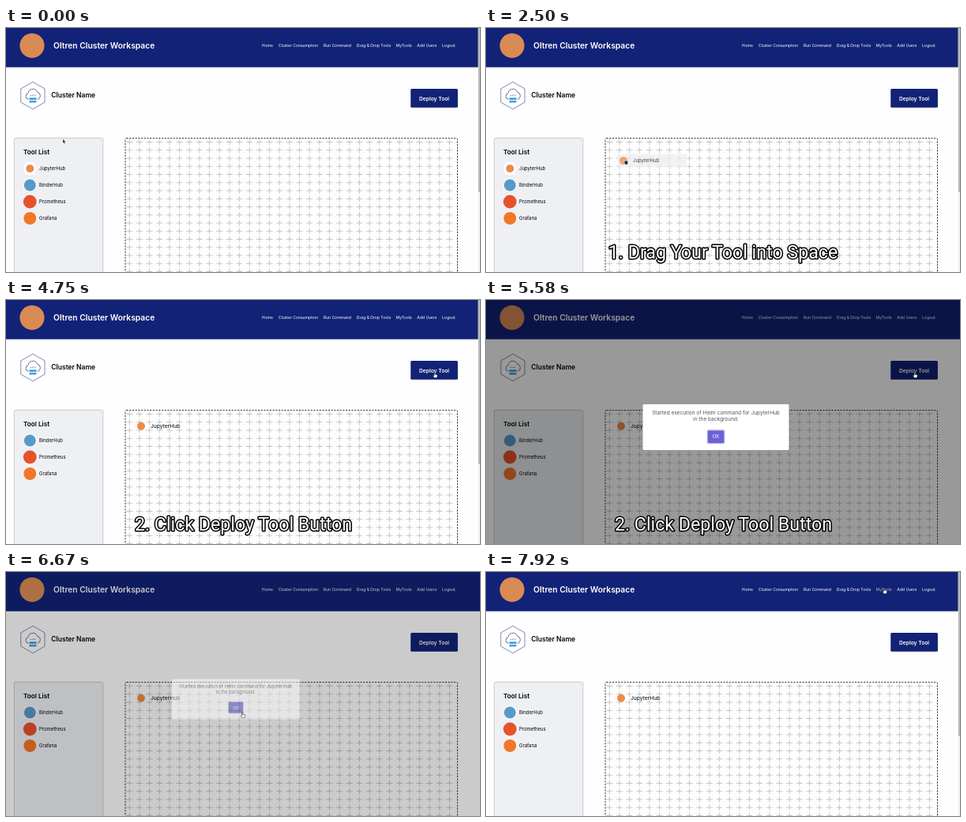
These frames come from a looping animation (600 px wide and 309 px high, 8 s). An HTML page:

```html
<!DOCTYPE html>
<html lang="en">
<head>
<meta charset="utf-8">
<title>Drag and drop tools</title>
<style>
html, body { margin: 0; width: 100%; height: 100%; overflow: hidden; background: #fefefe; }
svg { display: block; width: 100vw; height: 100vh; font-family: Inter, sans-serif; }
.nav { font-size: 5.05px; fill: #fff; }
.mid { text-anchor: middle; }
.cap { font: 400 23.2px Roboto, sans-serif; fill: #fff; stroke: #000; stroke-width: 3px;
  stroke-linejoin: round; paint-order: stroke; text-anchor: middle; }
</style>
</head>
<body>
<svg viewBox="0 0 600 309" preserveAspectRatio="none">
  <defs>
    <pattern id="plus" x="150" y="139.4" width="12.66" height="10.25" patternUnits="userSpaceOnUse">
      <path d="M2.2 5.1h8M6.2 1.3v7.6" stroke="#b4b4b8" stroke-width=".75"/>
    </pattern>
  </defs>
  <rect width="600" height="309" fill="#fefefe"/>
  <rect width="600" height="49.7" fill="#122276"/>
  <circle cx="33" cy="22.3" r="15.6" fill="#d98a55"/>
  <text x="60" y="26" font-size="10.3" font-weight="600" fill="#fff">Oltren Cluster Workspace</text>
  <g id="nav"></g>

  <g fill="none" stroke="#5a6078" stroke-width=".9" stroke-linejoin="round">
    <path d="M34 68.3 49 76.9v17.2L34 102.7 18.8 94.1V76.9Z" fill="#fff" stroke="#7480a6"/>
    <path d="M28.6 90.3a3.9 3.9 0 0 1-.5-7.7 6 6 0 0 1 11.6-1.3 4.6 4.6 0 0 1 .2 9"/>
    <path d="M30.7 85.3h7" stroke-dasharray="1.4 1.2"/>
    <path d="M29.5 89.6h9M29.5 93.2h9" stroke="#45a0e0" stroke-width="2.6"/>
  </g>
  <text x="57.3" y="88.4" font-size="8.5" font-weight="600">Cluster Name</text>
  <rect x="512.2" y="77" width="59.7" height="23.8" rx="1.5" fill="#122276"/>
  <text class="mid" x="542" y="91.6" font-size="6.7" font-weight="600" fill="#fff">Deploy Tool</text>

  <rect x="10.4" y="139.4" width="112.4" height="190" rx="1.5" fill="#eef0f3" stroke="#b3b6bb" stroke-width=".7"/>
  <text x="22" y="159.6" font-size="8.2" font-weight="600">Tool List</text>
  <g id="tools"></g>

  <rect x="151" y="139.6" width="420.5" height="200" fill="url(#plus)"/>
  <rect x="151" y="139.6" width="420.5" height="200" rx="1.5" fill="none" stroke="#1c1c1c" stroke-width=".9" stroke-dasharray="2.2 1.5"/>
  <g id="dropped">
    <circle cx="171" cy="159.7" r="5" fill="#f0894a"/>
    <text x="183" y="162.2" font-size="6.7">JupyterHub</text>
  </g>
  <g id="ghost" opacity=".75">
    <rect x="22" y="169.5" width="88" height="17" fill="#eceef1"/>
    <circle cx="30" cy="178" r="5" fill="#f0894a"/>
    <text x="42" y="180.4" font-size="5.95">JupyterHub</text>
  </g>
  <g id="scroll">
    <rect x="597.6" width="2.4" height="309" fill="#f1f1f1"/>
    <rect x="597.9" width="2.1" height="208" fill="#b9b9bd"/>
  </g>

  <rect id="dim" width="600" height="309"/>
  <g id="modal">
    <rect x="-108" y="-34" width="216" height="68" rx="2" fill="#fff"/>
    <g class="mid" font-size="7.65" fill="#545454">
      <text y="-19.2">Started execution of Helm command for JupyterHub</text>
      <text y="-9.8">in the background.</text>
    </g>
    <rect x="-13.2" y="3.8" width="26.4" height="21" rx="2.4" fill="#b7b2ef"/>
    <rect id="ok" x="-11.8" y="5.2" width="23.6" height="18.2" rx="1.5"/>
    <text class="mid" y="16.8" font-size="7" fill="#fff">OK</text>
  </g>
  <text id="cap1" class="cap" x="300" y="292">1. Drag Your Tool into Space</text>
  <text id="cap2" class="cap" x="300.5" y="292">2. Click Deploy Tool Button</text>
  <path id="cursor" stroke-linejoin="round"/>
</svg>
<script>
const $ = id => document.getElementById(id);
const LOOP = 8000, STEP = 1000 / 12;

$('nav').innerHTML = [[323.7, 'Home'], [344.8, 'Cluster Consumption'], [401.8, 'Run Command'],
  [443.8, 'Drag &amp; Drop Tools'], [493.6, 'MyTools'], [520.3, 'Add Users'], [552, 'Logout']]
  .map(([x, s]) => `<text class="nav" x="${x}" y="24.1">${s}</text>`).join('');
const myTools = $('nav').children[4];

$('tools').innerHTML = [['JupyterHub', '#f0894a', 5], ['BinderHub', '#579aca', 7.5],
  ['Prometheus', '#e6522c', 8.4], ['Grafana', '#f2762a', 8]]
  .map(([s, c, r], i) => `<g transform="translate(0 ${178 + 21 * i})">
    <circle cx="30.3" r="8.4" fill="#fff"/><circle cx="30.3" r="${r}" fill="${c}"/>
    <text x="42" y="2.4" font-size="5.95">${s}</text></g>`).join('');
const tools = [...$('tools').children];

// Pointer shapes: path, fill, outline
const shapes = {
  arrow: ['M0 0V5.6L1.3 4.4 2.2 6.4 3.1 6 2.2 4.1H3.9Z', '#111', '#fff'],
  hand: ['M0 0h1v2.6l3 .6v2l-.7 1.8H.2L-1.6 4.3l.6-.6 1 .8Z', '#fff', '#111'],
  fist: ['M-1.8-.8h4.4v2.8L2 4H-.6L-1.8 2Z', '#222', '#eee'],
  move: ['M0-3 1.1-1.7H.4V-.4H1.7V-1.1L3 0 1.7 1.1V.4H.4V1.7H1.1L0 3-1.1 1.7H-.4V.4H-1.7V1.1L-3 0-1.7-1.1V-.4H-.4V-1.7H-1.1Z', '#222', '#fff']
};
const kinds = [[0, 'arrow'], [660, 'hand'], [1330, 'fist'], [2580, 'move'], [3750, 'arrow'],
  [4330, 'hand'], [5660, 'arrow'], [6160, 'hand'], [6740, 'arrow'], [7830, 'hand']];
const xs = [[80, 72], [750, 33], [1330, 33], [1667, 70], [2083, 118], [2500, 177], [3420, 177],
  [3750, 186], [4420, 542], [5580, 542], [6330, 299], [7000, 298.5], [7917, 503.5]];
const ys = [[80, 140.5], [750, 179], [1330, 179], [1667, 183.5], [2083, 178], [2500, 169], [3420, 169],
  [3750, 167], [4420, 91.5], [5580, 91.5], [6330, 178], [7000, 177.5], [7917, 20.5]];
const popIn = [[0, .7], [135, 1.05], [240, .95], [300, 1]];

const smooth = p => p * p * (3 - 2 * p);
function track(keys, t, ease = p => p) {
  const i = keys.findIndex(k => k[0] > t);
  if (i < 0) return keys.at(-1)[1];
  if (!i) return keys[0][1];
  const [a, u] = keys[i - 1], [b, v] = keys[i];
  return u + (v - u) * ease((t - a) / (b - a));
}
const show = (el, o) => el.setAttribute('opacity', +o);
const within = (t, a, b) => t >= a && t < b;
const fade = (t, a, b) => Math.max(0, Math.min(1, (t - a) / 160, (b - t) / 160));

function draw(t) {
  const x = track(xs, t, smooth), y = track(ys, t, smooth);
  const kind = kinds.findLast(k => k[0] <= t)[1];
  const [d, fill, stroke] = shapes[kind];
  const cursor = $('cursor');
  Object.entries({ d, fill, stroke, 'stroke-width': .5, transform: `translate(${x} ${y})` })
    .forEach(a => cursor.setAttribute(...a));

  const dropped = t >= 2580;
  show($('dropped'), dropped);
  show($('ghost'), within(t, 1400, 2580) ? .75 : 0);
  $('ghost').setAttribute('transform', `translate(${x - 33} ${y - 179})`);
  tools.forEach((g, i) => g.setAttribute('transform', `translate(0 ${178 + 21 * (i - dropped)})`));
  show(tools[0], !dropped);

  show($('cap1'), fade(t, 1250, 2840));
  show($('cap2'), fade(t, 3830, 6100));

  const closing = t >= 6660;
  const open = within(t, 5520, 6740);
  show($('dim'), open ? (closing ? .2 : .4) : 0);
  show($('modal'), open ? (closing ? .5 : 1) : 0);
  const scale = closing ? .75 : track(popIn, t - 5523);
  $('modal').setAttribute('transform', `translate(291 161) scale(${scale})`);
  $('ok').setAttribute('fill', t > 6160 ? '#4a4bc4' : '#6a62d2');
  show($('scroll'), !within(t, 5520, 6820));
  myTools.style.fill = t > 7830 ? '#b9bccb' : '';
}

function tick(now) {
  draw(Math.floor((now % LOOP + 4) / STEP) * STEP % LOOP);
  requestAnimationFrame(tick);
}
draw(0);
requestAnimationFrame(tick);
</script>
</body>
</html>
```
